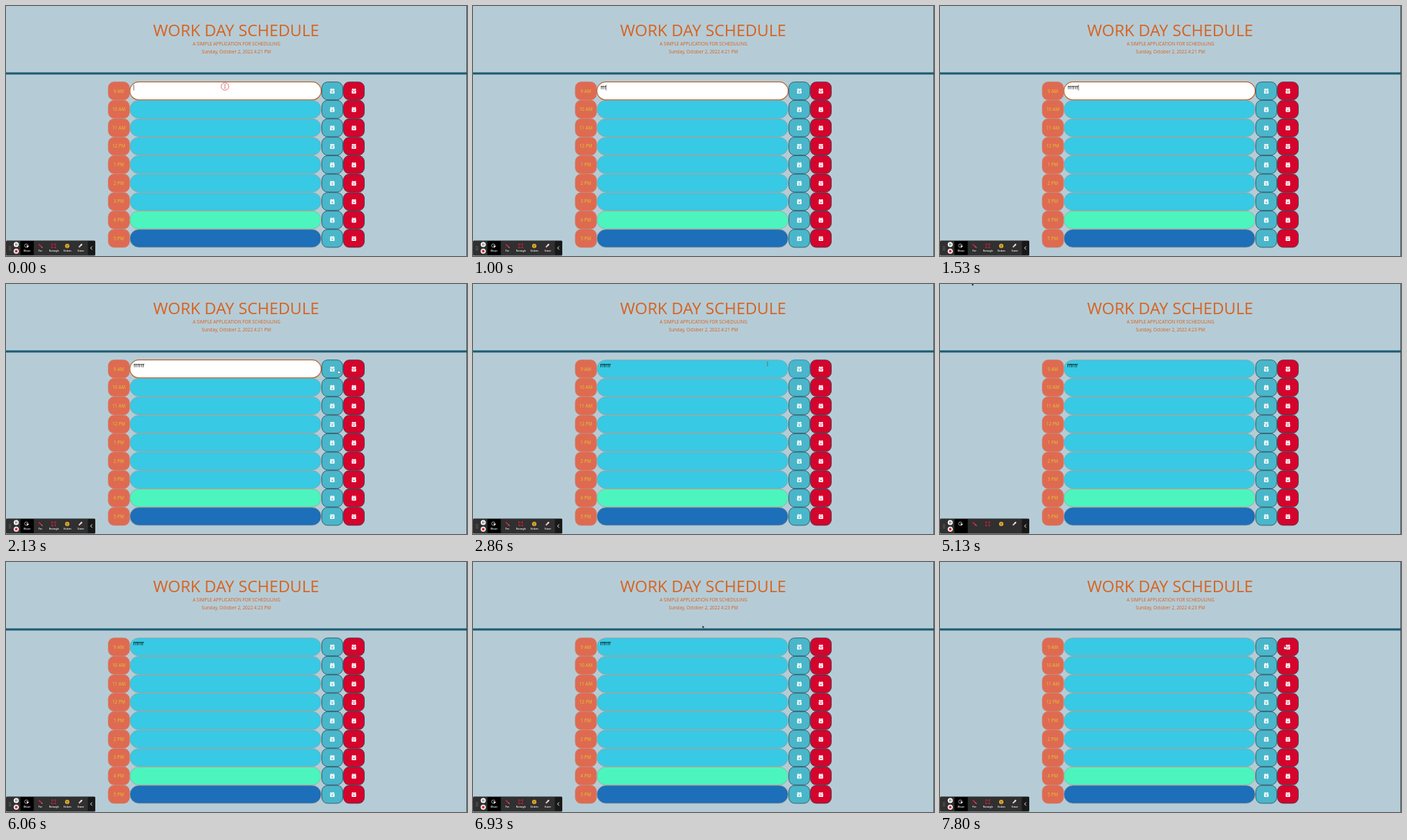
Recreate the animation shown at these times as an HTML page. Size 640 by 348 pixels, loop 8 s.

```html
<!DOCTYPE html>
<html lang="en">
<head>
<meta charset="utf-8">
<title>Work Day Schedule</title>
<style>
  html, body { margin: 0; width: 100%; height: 100%; overflow: hidden; background: #b5ccd7; }
  svg { display: block; width: 100vw; height: 100vh; }
  text { font-family: "Open Sans", "Noto Sans", sans-serif; font-size: 6.27px; }
  .mid { text-anchor: middle; }
  .head { fill: #d9611c; }
  .label { fill: #e2c236; }
  .tool { font-size: 2.9px; font-weight: 600; fill: #fff; }
</style>
</head>
<body>
<svg viewBox="0 0 640 348">
  <defs>
    <g id="calendar" fill="#fff">
      <rect x="-3.1" y="-2.7" width="6.2" height="1.5" rx=".5"/>
      <rect x="-2" y="-3.6" width="1" height="1.8" rx=".4"/>
      <rect x="1" y="-3.6" width="1" height="1.8" rx=".4"/>
      <rect x="-3.1" y="-.9" width="6.2" height="4.4" rx=".6"/>
    </g>
  </defs>
  <rect width="640" height="348" fill="#b5ccd7"/>
  <rect y="92.4" width="640" height="3" fill="#1d5c70"/>
  <rect x="639.2" width=".8" height="348" fill="#39474f"/>
  <g class="head mid">
    <text x="319.5" y="42.3" style="font-size:22.4px">WORK DAY SCHEDULE</text>
    <text x="320" y="55.2">A SIMPLE APPLICATION FOR SCHEDULING</text>
    <text id="date" x="319.8" y="66.4"></text>
  </g>
  <g id="rows"></g>
  <text id="entry" y="115.6" style="font-size:7.3px"></text>
  <path id="caret" stroke="#222" stroke-width=".6"/>

  <g id="toolbar">
    <rect y="326.4" width="124" height="21" rx="1.5" fill="#303030"/>
    <path d="M4.6 334.5v6M6.4 334.5v6" stroke="#888" stroke-width=".9" stroke-dasharray="1 1.3"/>
    <circle cx="14.2" cy="332" r="3.5" fill="#fff"/>
    <path d="M13.3 330.4v3.2M15.1 330.4v3.2" stroke="#333" stroke-width=".8"/>
    <circle cx="14.2" cy="341.2" r="3.5" fill="#fff"/>
    <rect x="12.4" y="339.4" width="3.6" height="3.6" rx=".6" fill="#dc3440"/>
    <rect x="20" y="327.2" width="18.6" height="19.4" fill="#000"/>
    <circle cx="28.2" cy="333.6" r="2.4" fill="none" stroke="#fff" stroke-width=".6"/>
    <path d="M28.2 333l4 1.6-1.7.7-.6 1.8z" fill="#fff"/>
    <path d="M45.5 331.7l4.5 4.2" stroke="#c52440" stroke-width="1.8"/>
    <path d="M49.5 335.4l1.1 1.1" stroke="#eee" stroke-width=".9"/>
    <rect x="63.7" y="331.8" width="5" height="4.2" fill="none" stroke="#b51f38" stroke-width=".9"/>
    <path d="M63 331.1h1.4M68 331.1h1.4M63 336.6h1.4M68 336.6h1.4" stroke="#d12b45"/>
    <circle cx="85" cy="334" r="3" fill="#f3b82d"/>
    <path d="M83.2 333.2h3.6M83.7 334.9q1.3 1.4 2.6 0" fill="none" stroke="#533" stroke-width=".7"/>
    <path d="M101.2 335.7l3-3" stroke="#f2b2b2" stroke-width="2"/>
    <path d="M103.7 333.2l1.8-1.8" stroke="#eee" stroke-width="2"/>
    <g id="toolLabels" class="mid"></g>
    <rect x="113.6" y="327.2" width="9.8" height="19.4" fill="#181818"/>
    <path d="M119.6 334.6l-2.2 2.3 2.2 2.3" fill="none" stroke="#fff" stroke-width=".9"/>
  </g>

  <circle id="ring" r="5.2" fill="none" stroke="#dc5560" stroke-width=".8"/>
  <g id="pointer">
    <path id="beam" d="M-.8-2.5h1.6M0-2.5v5M-.8 2.5h1.6" stroke="#a33c42" stroke-width=".6"/>
    <path id="arrow" d="M0 0v3l.8-.6.5 1 .5-.3-.5-1h1z" fill="#111" stroke="#333" stroke-width=".2"/>
    <path id="hand" d="M-1.3-2.2q.6-.6 1 .1v1.5l2 .5q.7.3.5 1l-.4 1.7h-2.4l-1.4-1.7q0-.8.7-.6z" fill="#fff" stroke="#223" stroke-width=".35"/>
  </g>
</svg>
<script>
const LOOP = 8000, SAVE = 2330, RELOAD = 5130, TOOLS_READY = 5660, REMOVE = 7500;
const KEY_TIMES = [330, 620, 900, 1130, 1330, 1530];
const PATH = [
  [0, 304, 112], [1650, 304, 112], [2060, 462, 122], [2600, 462, 122], [3200, 330, 95],
  [3600, 79, 35], [3700, 79, 35], [3950, 45, -8], [5060, 45, -8], [5130, 44.5, -1],
  [5260, 44.5, -1], [5660, 45, -8], [6300, 60, -8], [6700, 220, 70], [7250, 479, 119], [8000, 479, 119]
];
const CLICKS = [-50, SAVE, REMOVE];
const $ = id => document.getElementById(id);

function add(parent, tag, attrs, text = "") {
  const node = document.createElementNS("http://www.w3.org/2000/svg", tag);
  for (const key in attrs) node.setAttribute(key, attrs[key]);
  node.textContent = text;
  parent.append(node);
  return node;
}

function cell(y, x, width, rx, fill, stroke) {
  return add($("rows"), "rect", { x, y, width, height: 25, rx, fill, stroke, "stroke-width": .7 });
}

function button(y, x, fill, iconPath) {
  const box = cell(y, x, 29, 8, fill, "#263c48");
  const icon = add($("rows"), "g", { transform: `translate(${x + 14.5} ${y + 12.6})` });
  add(icon, "use", { href: "#calendar" });
  add(icon, "path", { d: iconPath, stroke: fill, "stroke-width": .8 });
  return box;
}

let firstField, firstSave;
["9 AM", "10 AM", "11 AM", "12 PM", "1 PM", "2 PM", "3 PM", "4 PM", "5 PM"].forEach((hour, i) => {
  const y = 105.7 + i * 25.66;
  const fill = i < 7 ? "#38c9e4" : i === 7 ? "#4cf5be" : "#1c6fb8";
  cell(y, 142, 29.4, 8, "#de6b51", "#cf7860");
  add($("rows"), "text", { class: "label mid", x: 156.6, y: y + 14.8 }, hour);
  const field = cell(y, 172, 265.5, 12.5, fill, "#a89a91");
  const save = button(y, 438.5, "#4ab6ca", "M0-.3v3M-1.5 1.2h3");
  button(y, 468.5, "#d5042c", "M-1.5 1.2h3");
  firstField ??= field;
  firstSave ??= save;
});

[["Mouse", 29.2], ["Pen", 47.7], ["Rectangle", 66.5], ["Stickers", 85.3], ["Eraser", 104]]
  .forEach(([name, x]) => add($("toolLabels"), "text", { class: "tool", x, y: 342.3 }, name));

function position(t) {
  const i = Math.max(1, PATH.findIndex(p => p[0] > t));
  const [t0, x0, y0] = PATH[i - 1], [t1, x1, y1] = PATH[i];
  const u = (t - t0) / (t1 - t0), e = u * u * (3 - 2 * u);
  return [x0 + (x1 - x0) * e, y0 + (y1 - y0) * e];
}

const show = (id, on) => $(id).setAttribute("visibility", on ? "visible" : "hidden");

function draw(t) {
  const editing = t < SAVE;
  const typed = KEY_TIMES.filter(k => k <= t).length;
  const [x, y] = position(t);

  $("date").textContent = `Sunday, October 2, 2022 4:${t < RELOAD ? 21 : 23} PM`;
  firstField.setAttribute("fill", editing ? "#fff" : "#38c9e4");
  firstField.setAttribute("stroke", editing ? "#b9642c" : "#a89a91");
  firstField.setAttribute("stroke-width", editing ? 1.2 : .7);
  firstSave.setAttribute("stroke", t >= SAVE && t < RELOAD ? "#1976b5" : "#263c48");

  $("entry").textContent = t < REMOVE ? "f".repeat(typed) : "";
  $("entry").setAttribute("x", editing ? 177 : 176.4);
  const caretX = 177.4 + typed * 2.5;
  $("caret").setAttribute("d", `M${caretX} 109.6v8`);
  show("caret", editing && (t < 1600 || t % 1000 > 500));
  show("toolLabels", t < RELOAD || t >= TOOLS_READY);

  const overField = x > 172 && x < 437.5 && y > 105 && y < 337;
  const overButton = x >= 437.5 && x < 498 && y > 105;
  const hiddenWhileTyping = t > KEY_TIMES[0] && t < 1650;
  show("beam", overField && !hiddenWhileTyping);
  show("hand", overButton);
  show("arrow", !overField && !overButton);
  $("pointer").setAttribute("transform", `translate(${x} ${y})`);
  $("ring").setAttribute("cx", x);
  $("ring").setAttribute("cy", y);
  show("ring", CLICKS.some(c => t >= c && t < c + 200));
}

function frame() {
  draw(performance.now() % LOOP);
  requestAnimationFrame(frame);
}
frame();
</script>
</body>
</html>
```
